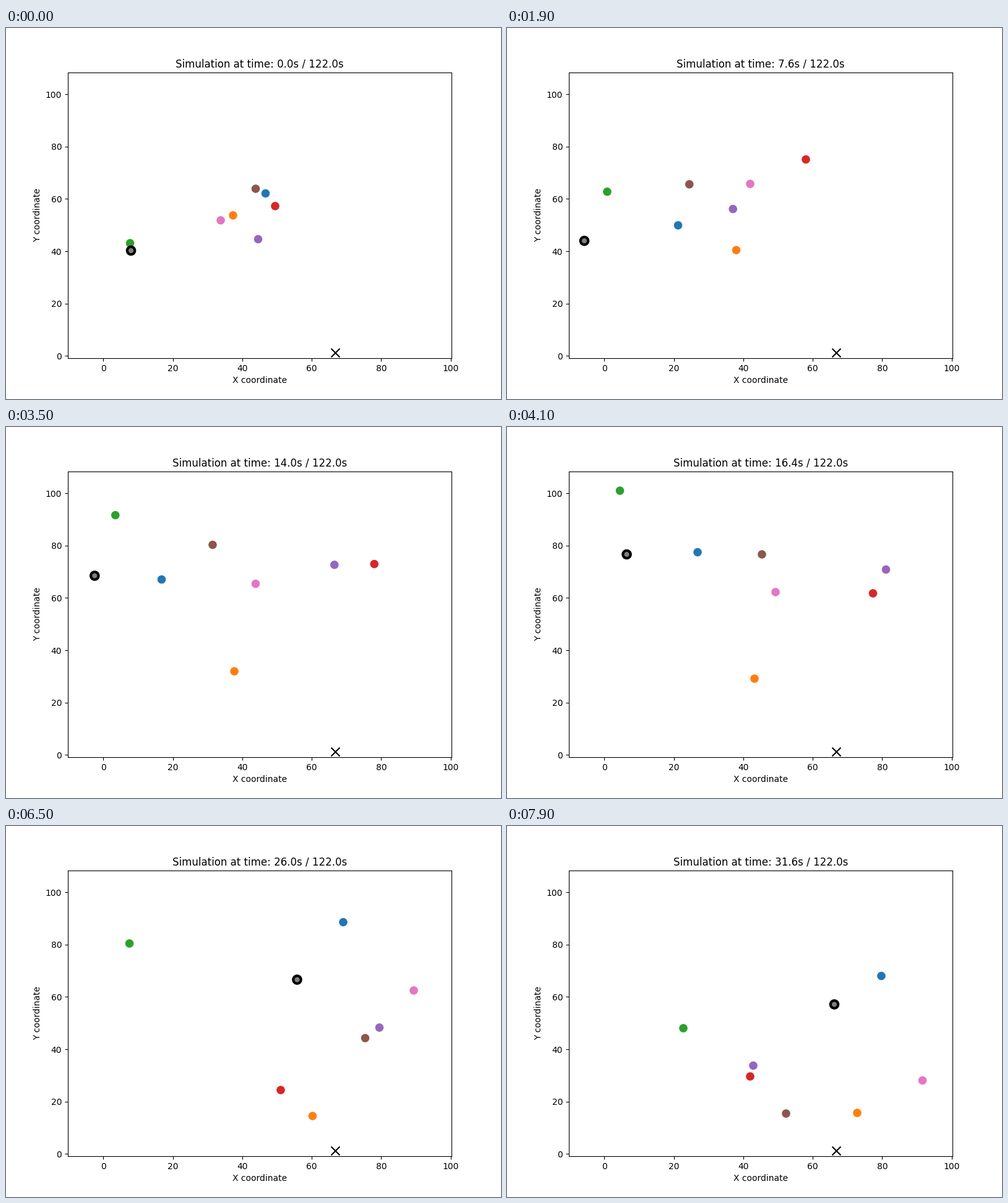
A matplotlib script that plays this animation: 800x600 px, repeating every 8000 ms.

```python
import numpy as np
import matplotlib.pyplot as plt
from matplotlib.animation import FuncAnimation

FRAMES, INTERVAL = 80, 100
STEP, TOTAL = 0.4, 122.0          # simulated seconds per frame, full length
XLIM, YLIM = (-10.19, 100.22), (-0.88, 108.32)

# Key points of each path in stage pixels, one per key time.
KEYS = np.array([0, 9, 28, 41, 53, 65, 79])
PATHS = {
    "blue": [(419.5, 267.5), (370, 298), (225.5, 298.5), (308, 202.5), (445.5, 168.5), (545, 155.5), (605, 242.5)],
    "orange": [(367, 303), (391.5, 330), (352, 381.5), (400, 407), (463.5, 439), (495.5, 469), (566, 464)],
    "green": [(200.5, 348), (168, 324), (171, 195), (182.5, 103), (195.5, 76), (199.5, 190), (285, 327)],
    "red": [(435, 288), (425, 267.5), (558.5, 189), (591.5, 269), (496.5, 359.5), (444, 427), (393, 405)],
    "purple": [(407.5, 341.5), (371.5, 339), (428, 242), (612.5, 230.5), (655.5, 295), (603.5, 326), (398, 387.5)],
    "brown": [(403.5, 260), (361, 289), (279.5, 203), (412, 206), (562.5, 284.5), (580.5, 343), (451, 465)],
    "pink": [(347, 311), (388.5, 282), (388.5, 242.5), (434, 267), (542, 271.5), (659, 266), (671.5, 411.5)],
    "gray": [(202, 360), (155, 360.5), (123, 298), (193.5, 206), (373.5, 225.5), (470.5, 248.5), (529, 288.5)],
}


def to_data(px, py):
    """Stage pixels to axes data."""
    return np.interp(px, (100, 720), XLIM), np.interp(py, (72, 534), YLIM[::-1])


def spline(t, keys, points):
    """Natural cubic spline as a line plus cubic radial terms."""
    n = len(keys)

    def bump(s):
        return np.abs(s[:, None] - keys) ** 3

    def line(s):
        return np.column_stack([np.ones(len(s)), s])

    system = np.block([[bump(keys), line(keys)],
                       [line(keys).T, np.zeros((2, 2))]])
    weights = np.linalg.solve(system, np.vstack([points, np.zeros((2, points.shape[1]))]))
    return bump(t) @ weights[:n] + line(t) @ weights[n:]


points = np.array(list(PATHS.values())).transpose(1, 0, 2).reshape(len(KEYS), -1)
stage = spline(np.arange(FRAMES), KEYS, points).reshape(FRAMES, -1, 2)
tracks = np.stack(to_data(stage[..., 0], stage[..., 1]), axis=-1)

fig, ax = plt.subplots(figsize=(8, 6), dpi=100)
ax.set(xlim=XLIM, ylim=YLIM, xlabel="X coordinate", ylabel="Y coordinate")
title = ax.set_title("")

colors = [f"tab:{name}" for name in PATHS]
dots = ax.scatter(*tracks[0].T, s=80, c=colors,
                  edgecolors=colors[:-1] + ["black"],
                  linewidths=[0.8] * (len(colors) - 1) + [3])
ax.scatter(*to_data(531.5, 525.4), s=100, marker="x", color="black")


def update(frame):
    dots.set_offsets(tracks[frame])
    title.set_text(f"Simulation at time: {frame * STEP:.1f}s / {TOTAL:.1f}s")
    return dots, title


anim = FuncAnimation(fig, update, frames=FRAMES, interval=INTERVAL, repeat=True)
plt.show()
```
